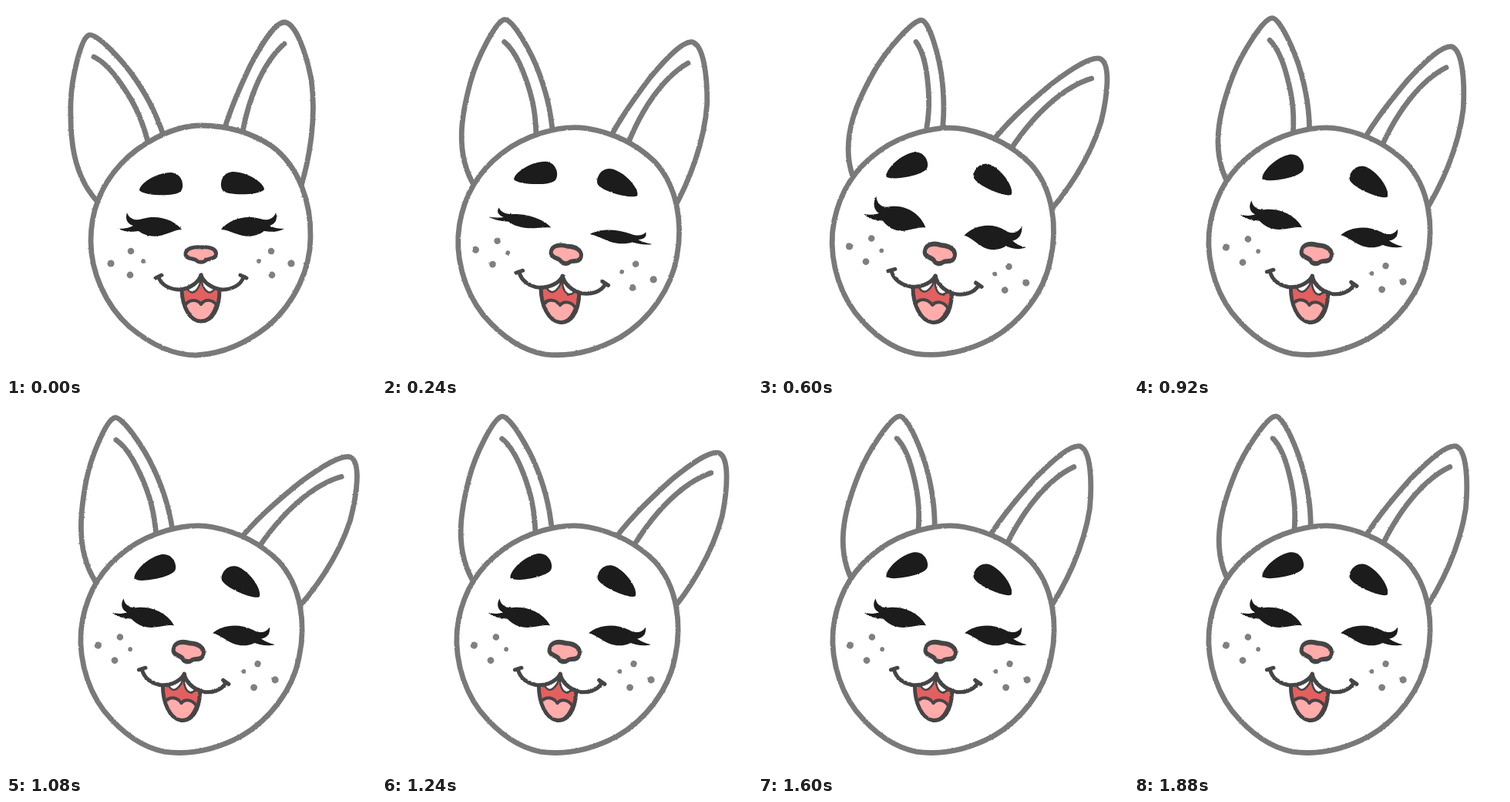
An HTML page that plays this animation: 480 px wide and 480 px high, repeating every 1.92 s.

```html
<!DOCTYPE html>
<html lang="en">
<head>
<meta charset="utf-8">
<title>Rabbit head tilt</title>
<style>
  html, body { margin: 0; width: 100%; height: 100%; overflow: hidden; background: #fff; }
  svg { display: block; width: 100vw; height: 100vh; }
  .fur { fill: #fff; stroke: #797979; stroke-width: 6.8; }
  .line { fill: none; }
  .ink { fill: none; stroke: #454545; stroke-width: 5; }
  .black { fill: #1c1c1c; }
  .pink { fill: #ffacaa; }
  .red { fill: #e2615f; }
  .thin { stroke-width: 4; }
  .tooth { fill: #fff; stroke-width: 2.5; }
</style>
</head>
<body>
<svg viewBox="0 0 480 480" stroke-linecap="round" stroke-linejoin="round">
  <defs>
    <filter id="pencil" filterUnits="userSpaceOnUse" x="0" y="0" width="480" height="480">
      <feTurbulence type="fractalNoise" baseFrequency="0.35" numOctaves="2" seed="4"/>
      <feDisplacementMap in="SourceGraphic" scale="2" xChannelSelector="R" yChannelSelector="G"/>
    </filter>
    <path id="eye" class="black" d="M228 290C219 278 198 270 177 276C169 279 160 277 157 268C154 277 158 283 165 285C159 288 153 289 146 289C155 294 165 293 172 292C180 298 190 300 200 298C212 295 220 290 228 290Z"/>
    <path id="brow" class="black" d="M173 239C173 231 194 216 214 216C230 217 232 236 226 241C217 248 178 246 173 239Z"/>
    <g id="cheek" fill="#808080">
      <circle cx="162" cy="318" r="4.3"/><circle cx="136" cy="334" r="4.6"/>
      <circle cx="178" cy="331" r="2.9"/><circle cx="161" cy="349" r="4.4"/>
    </g>
    <g id="lip" class="ink">
      <path class="tooth" d="M235 367Q244 378 251 362L253 353Q246 363 235 367Z"/>
      <path d="M194 353L202 349M198 352C202 363 214 368 226 368C240 366 250 358 253 349"/>
    </g>
  </defs>
  <g filter="url(#pencil)">
    <g id="earL" class="fur">
      <path d="M138 282L124 259C84 222 83 165 84 125C85 93 97 43 107 38C116 33 151 70 168 95C185 120 198 145 210 186"/>
      <path class="line" d="M114 66Q131 74 150 102C168 128 178 150 186 184"/>
    </g>
    <g id="earR" class="fur">
      <path d="M276 188C284 150 299 115 317 77C333 47 349 22 361 21C376 22 389 60 396 95C403 145 394 200 380 243L372 262"/>
      <path class="line" d="M361 49C335 72 311 120 303 190"/>
    </g>
    <g id="head">
      <path class="fur" d="M253 155C215 155 172 180 149 205C121 235 110 270 110 305C110 345 129 388 160 416C185 437 215 453 247 453C285 451 315 435 340 415C375 385 395 340 395 300C396 255 380 208 345 182C315 162 285 155 253 155Z"/>
      <use href="#cheek"/>
      <use href="#cheek" transform="translate(506 0) scale(-1 1)"/>
      <g id="eyes">
        <use href="#eye"/>
        <use href="#eye" transform="translate(507 0) scale(-1 1)"/>
      </g>
      <g id="mouth">
        <g id="jaw">
          <path class="red" d="M228 369C229 390 238 409 253 409C268 409 277 392 277 369Q262 366 253 352Q245 366 228 369Z"/>
          <path class="ink pink thin" d="M232 389C237 380 248 380 253 387C258 380 268 380 273 388C268 402 262 409 253 409C244 409 238 402 232 389Z"/>
          <path class="ink" d="M228 369C229 390 238 409 253 409C268 409 277 392 277 369"/>
        </g>
        <use href="#lip"/>
        <use href="#lip" transform="translate(506 0) scale(-1 1)"/>
      </g>
      <path id="nose" class="ink pink" d="M233 322C233 314 244 312 253 313C262 312 273 314 272.5 322C272 329 262 327 259 330C256 333 250 333 247 330C244 327 233 329 233 322Z"/>
    </g>
    <use id="browL" href="#brow"/>
    <use id="browR" href="#brow"/>
  </g>
</svg>
<script>
const LOOP = 1920, STEP = 40, HOLD = 120, GO = 80;
const NECK = [236, 237];

// ease: 0 to 1 between two times; pulse: 0 to 1 and back.
const progress = (t, from, to) => Math.min(1, Math.max(0, (t - from) / (to - from)));
const ease = (t, from, to) => (1 - Math.cos(Math.PI * progress(t, from, to))) / 2;
const pulse = (t, from, to) => Math.sin(Math.PI * progress(t, from, to)) ** 2;

const pose = (id, value) => document.getElementById(id).setAttribute('transform', value);
const about = (x, y, change) => `translate(${x} ${y}) ${change} translate(${-x} ${-y})`;

// Each ear's root follows the head, while the ear turns at its own angle.
function poseEar(id, [x, y], head, turn) {
  pose(id, `rotate(${head} ${NECK}) rotate(${turn - head} ${x} ${y})`);
}
function poseBrow(id, x, y, turn, side) {
  pose(id, `translate(${x} ${y}) rotate(${turn}) scale(${side} 1) translate(-201 -231)`);
}

function draw(ms) {
  const loopTime = ms % LOOP;
  const t = loopTime < HOLD ? 0 : Math.floor(loopTime / STEP) * STEP;
  const turn = ease(t, GO, 340);
  const rebound = pulse(t, 760, 1040);
  const flick = pulse(t, 880, 1380);
  const lift = pulse(t, 400, 900);

  const head = 11 * turn + 3.7 * pulse(t, GO, 680);
  pose('head', `rotate(${head} ${NECK})`);
  poseEar('earL', [173, 246], head, 20.5 * turn + 10.5 * pulse(t, 220, 780) - 0.5 * rebound - 12.5 * flick);
  poseEar('earR', [344.7, 219.5], head, 16.4 * turn + 14 * pulse(t, 200, 760) - 2.5 * rebound + 10.5 * flick);

  const open = 1 - 0.73 * pulse(t, 140, 560) + 0.25 * pulse(t, 460, 780);
  pose('eyes', about(253.5, 289, `scale(1 ${open})`));
  pose('mouth', about(253, 349, `rotate(${-0.18 * head}) scale(${1 + 0.06 * pulse(t, GO, 840)} 1)`));
  pose('jaw', about(252, 370, `skewX(${0.62 * head})`));
  pose('nose', about(253, 331, `scale(1 ${1 + 0.25 * turn})`));

  poseBrow('browL', 201 - 9 * ease(t, GO, 600), 231 - 21 * turn - 3 * lift + 3 * flick, -13 * ease(t, 200, 600), 1);
  poseBrow('browR', 307, 230 - 2 * turn + 8 * pulse(t, 200, 520) - 3 * lift + 3 * flick, 26 * turn, -1);
}

const start = performance.now();
function tick() {
  draw(performance.now() - start);
  requestAnimationFrame(tick);
}
tick();
</script>
</body>
</html>
```
